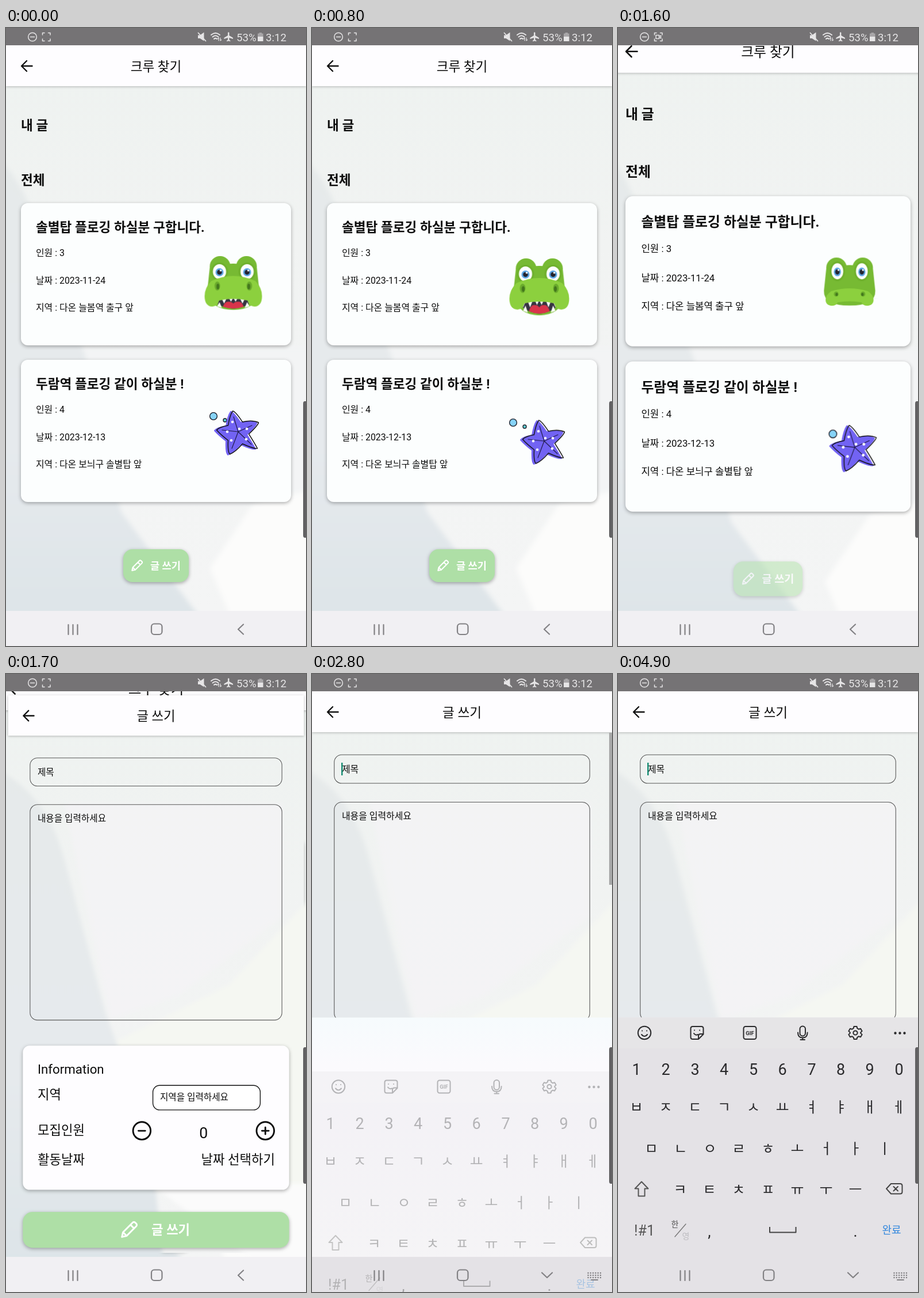
An HTML page that plays this animation: 522 px wide and 1073 px high, repeating every 5 s.

```html
<!DOCTYPE html>
<html lang="ko">
<head>
<meta charset="utf-8">
<title>크루 찾기</title>
<style>
html, body { margin: 0; width: 100%; height: 100%; overflow: hidden; background: #fff; }
svg { display: block; width: 522px; height: 1073px; }
text { font: 22.6px Roboto, "Noto Sans CJK KR", "Noto Sans CJK", sans-serif; fill: #0c0c0c; white-space: pre; }
.b { font-weight: 600; }
.s { font-size: 15.9px; }
.m { text-anchor: middle; }
.e { text-anchor: end; }
.ln { fill: none; stroke-linecap: round; stroke-linejoin: round; }
.shade { filter: drop-shadow(0 2px 3px rgba(0,0,0,.32)); }
.bar text { font-size: 18.6px; fill: #e6e5e6; }
.white { fill: #fff; }
.keys text { font-size: 25px; fill: #2a2a2c; text-anchor: middle; }
.keys .num { font-size: 27px; }

/* every animation shares one 5 s clock */
.list, .form, .fade, .press, .rec, .caret, .thumb, .board, .late, .early,
.croc, .head, .eyes, .mouth, .snout, .star, .bubbles { animation: 5s linear infinite; }

.list { transform-origin: 261px 521px; animation-name: grow; }
@keyframes grow {
  0%, 30.28% { transform: none; animation-timing-function: cubic-bezier(.35,.45,0,1); }
  38.28%, 100% { transform: scale(1.1); }
}
.form { transform-origin: 261px 521px; animation-name: enter; }
@keyframes enter {
  0%, 30.28% { transform: scale(.85); animation-timing-function: cubic-bezier(.35,.45,0,1); }
  38.28%, 100% { transform: none; }
}
.fade { animation-name: fade; }
@keyframes fade { 0%, 32.7% { opacity: 0; } 33.6%, 100% { opacity: 1; } }
.press { animation-name: press; }
@keyframes press { 0%, 22% { opacity: 1; } 25%, 30% { opacity: .2; } 32% { opacity: .5; } 35%, 100% { opacity: 1; } }

.rec { animation: rec 1s step-end infinite; }
@keyframes rec { 0% { opacity: 0; } 15% { opacity: 1; } 65%, 100% { opacity: 0; } }
.caret { animation-name: caret; animation-timing-function: step-end; }
@keyframes caret { 0% { opacity: 0; } 54% { opacity: 1; } 62% { opacity: 0; } 72% { opacity: 1; } 82% { opacity: 0; } 92%, 100% { opacity: 1; } }
.thumb { transform-origin: 0 102px; animation-name: thumb; animation-timing-function: step-end; }
@keyframes thumb {
  0% { opacity: 0; transform: none; }
  40% { opacity: 1; transform: none; }
  55% { opacity: 1; transform: scaleY(.295); }
  66%, 100% { opacity: 0; transform: scaleY(.295); }
}
.late { animation-name: late; animation-timing-function: step-end; }
@keyframes late { 0% { opacity: 0; } 55%, 100% { opacity: 1; } }
.early { animation-name: early; animation-timing-function: step-end; }
@keyframes early { 0% { opacity: 1; } 55%, 100% { opacity: 0; } }
.board { animation-name: board; }
@keyframes board {
  0%, 54.5% { opacity: 0; transform: translateY(130px); }
  56% { opacity: .34; transform: translateY(94px); }
  58% { opacity: .75; transform: translateY(44px); }
  60% { opacity: 1; transform: translateY(16px); }
  63%, 100% { opacity: 1; transform: none; }
}

.croc { animation-name: croc; }
@keyframes croc { 0% { transform: translateY(-4px); } 16%, 100% { transform: none; } }
.head { animation-name: head; }
@keyframes head { 0%, 24% { transform: none; } 29%, 100% { transform: translateY(2px) scale(.94); } }
.eyes { animation-name: eyes; }
@keyframes eyes { 0%, 24% { transform: none; } 29%, 100% { transform: translateY(1px) scale(.84,1.02); } }
.mouth { transform-origin: 0 22px; animation-name: mouth; }
@keyframes mouth { 0% { transform: scaleY(.8); } 16%, 24% { transform: none; } 29%, 100% { transform: scaleY(.01); } }
.snout { animation-name: snout; }
@keyframes snout { 0% { transform: scale(.96,.97); } 16%, 24% { transform: none; } 29%, 100% { transform: translateY(14px) scale(.76,.52); } }
.star { animation-name: bob; animation-timing-function: ease-in-out; }
@keyframes bob { 0%, 48%, 100% { transform: none; } 24% { transform: translateY(21px); } }
.bubbles { animation-name: drift; }
@keyframes drift {
  0% { transform: none; opacity: 1; }
  16% { transform: translate(-11px,-5px); opacity: 1; }
  22% { transform: translate(-15px,-7px); opacity: 0; }
  22.1% { transform: translate(22px,14px); opacity: 1; }
  32%, 100% { transform: translate(7px,5px); opacity: 1; }
}
</style>
</head>
<body>
<svg viewBox="0 0 522 1073">
<defs>
  <filter id="soft" x="-20%" y="-20%" width="140%" height="140%"><feGaussianBlur stdDeviation="4"/></filter>
  <linearGradient id="base" x2="0" y2="1">
    <stop offset="0" stop-color="#eef2f0"/><stop offset=".35" stop-color="#f1f3f2"/><stop offset="1" stop-color="#f4f5f5"/>
  </linearGradient>
  <linearGradient id="cool" x2="0" y2="1">
    <stop offset="0" stop-color="#e6eaea"/><stop offset=".6" stop-color="#e6eaed"/><stop offset="1" stop-color="#dde4e8"/>
  </linearGradient>
  <linearGradient id="blank" x2="0" y2="1">
    <stop offset="0" stop-color="#f6fbfd"/><stop offset=".2" stop-color="#fbfafd"/><stop offset="1" stop-color="#fdfdfd"/>
  </linearGradient>
  <clipPath id="app"><path d="M0 30H522V1012H0z"/></clipPath>
  <clipPath id="page"><path d="M0 30H522V1012H0z"/></clipPath>
  <path id="pencil" d="M4 20l1.2-5.2L15.8 4.2a2 2 0 0 1 2.8 0l1.2 1.2a2 2 0 0 1 0 2.8L9.2 18.8zM13.4 6.6l4 4M5.2 14.8l4 4"/>
  <path id="starfish" d="M-9-37Q-4-36 8-18Q25-22 36-17Q35-12 19 3Q28 17 34 28Q28 29 8 20Q-4 34-14 38Q-18 34-17 14Q-30 4-37-4Q-33-9-17-12Q-14-30-9-37z"/>
  <g id="top">
    <path d="M0 30H522V101H0z" fill="#fefdff" style="filter:drop-shadow(0 1px 2px rgba(0,0,0,.25))"/>
    <path d="M36 57L27 66L36 75M27.5 66H45.5" class="ln" stroke="#111" stroke-width="2.4"/>
  </g>
  <g id="eye">
    <ellipse rx="15" ry="16" fill="#6fb02d"/>
    <ellipse rx="11.5" ry="13" fill="#fff"/>
    <circle cy="1" r="7" fill="#5ba5e4"/>
    <circle cy="1" r="4.3" fill="#23232e"/>
    <circle cx="2" cy="-2" r="1.7" fill="#fff"/>
  </g>
</defs>

<g clip-path="url(#app)">
  <g class="list">
    <path d="M0 30H522V1012H0z" fill="url(#base)"/>
    <g filter="url(#soft)">
      <path d="M-20 225Q20 250 45 320L140 575L200 840L350 1040H-20z" fill="url(#cool)"/>
      <path d="M135 555H540V830H200z" fill="#f3f4f5"/>
      <path d="M430 826L355 938L394 1030H540V800z" fill="#fcfcfb"/>
    </g>
    <use href="#top"/>
    <text class="m" x="261" y="75">크루 찾기</text>
    <text class="b" x="26" y="177">내 글</text>
    <text class="b" x="26" y="272">전체</text>

    <g class="shade" fill="#fcfefe">
      <rect x="26" y="304" width="470" height="247" rx="12"/>
      <rect x="26" y="576" width="470" height="247" rx="12"/>
    </g>
    <text class="b" x="52" y="354">솔별탑 플로깅 하실분 구합니다.</text>
    <text class="s" x="52" y="396">인원 : 3</text>
    <text class="s" x="52" y="444">날짜 : 2023-11-24</text>
    <text class="s" x="52" y="491">지역 : 다온 늘봄역 출구 앞</text>
    <text class="b" x="52" y="626">두람역 플로깅 같이 하실분 !</text>
    <text class="s" x="52" y="668">인원 : 4</text>
    <text class="s" x="52" y="716">날짜 : 2023-12-13</text>
    <text class="s" x="52" y="763">지역 : 다온 보늬구 솔별탑 앞</text>

    <g transform="translate(395.5 450)"><g class="croc">
      <g class="head" fill="#77ba33">
        <circle cx="-23" cy="-32" r="18"/><circle cx="23" cy="-32" r="18"/>
        <path d="M-41-30Q0-44 41-30L45 8Q46 34 0 34Q-46 34-45 8z"/>
      </g>
      <g class="eyes">
        <use href="#eye" x="-24" y="-23"/><use href="#eye" x="24" y="-23"/>
      </g>
      <g class="mouth">
        <path d="M-38 22H38Q38 47 0 49Q-38 47-38 22z" fill="#77ba33"/>
        <path d="M-34 20H34Q34 42 0 46Q-34 42-34 20z" fill="#363541"/>
        <path d="M-18 42Q-15 30-8 31Q-3 31 0 35Q3 31 8 31Q15 30 18 42Q0 50-18 42z" fill="#d9344b"/>
        <path d="M-33 22h10l-5 13zM-21 22h10l-5 13zM-8 22h8l-4 9zM0 22h8l-4 9zM11 22h10l-5 13zM23 22h10l-5 13zM-28 41l4-9 4 12zM20 44l4-12 4 9z" fill="#fff"/>
      </g>
      <g class="snout">
        <path d="M-40-7Q0-25 40-7Q52 5 52 20Q52 38 38 39Q28 38 26 28Q0 22-26 28Q-28 38-38 39Q-52 38-52 20Q-52 5-40-7z" fill="#8cd03e"/>
        <ellipse cx="-29" cy="2" rx="5" ry="8" fill="#6aab2c"/><ellipse cx="29" cy="2" rx="5" ry="8" fill="#6aab2c"/>
        <ellipse cx="-28" cy="3" rx="2.6" ry="5" fill="#43761d"/><ellipse cx="28" cy="3" rx="2.6" ry="5" fill="#43761d"/>
      </g>
    </g></g>

    <g transform="translate(402 702)"><g class="star">
      <g class="bubbles" stroke="#15151f" stroke-width="1.3">
        <circle cx="-41" cy="-28" r="6.4" fill="#86d3f7"/>
        <circle cx="-21" cy="-21" r="3" fill="#62d2d8"/>
      </g>
      <use href="#starfish" x="1.5" fill="#fff"/>
      <use href="#starfish" x="-2" y="1" fill="#7263f3" stroke="#7263f3" stroke-width="2" stroke-linejoin="round"/>
      <use href="#starfish" x="1.5" class="ln" stroke="#111" stroke-width="1.4"/>
      <path d="M2-1L-6-27M2-1L26-12M2-1L25 21M2-1L-9 28M2-1L-26-4" class="ln" stroke="#1d1940" stroke-width="1.1"/>
      <path d="M-8-18h0M17-6h0M16 12h0M-10 14h0M-17-1h0M4-6h0" class="ln" stroke="#fff" stroke-width="4.6"/>
    </g></g>

    <g class="press">
      <rect class="shade" x="204" y="905" width="114" height="57" rx="16" fill="#aedfa6"/>
      <use href="#pencil" class="ln" stroke="#fff" stroke-width="1.9" transform="translate(215 920.5) scale(1.08)"/>
      <text class="b white" x="251" y="940" style="font-size:17.6px">글 쓰기</text>
    </g>
  </g>

  <g class="fade"><g class="form">
    <path d="M0 30H522V1012H0z" fill="url(#base)"/>
    <g filter="url(#soft)">
      <path d="M190 640L390 540L540 380V920L180 900z" fill="#f5f7f2"/>
      <path d="M-20 160Q70 205 100 322L172 590L250 800L275 1040H-20z" fill="url(#cool)"/>
      <path d="M100 222H484V420L300 560L180 602z" fill="#f4f3f6" opacity=".75"/>
      <path d="M250 890H540V1030H440z" fill="#fbfbfb"/>
    </g>
    <use href="#top"/>
    <text class="m" x="261" y="75">글 쓰기</text>
    <g fill="none" stroke="#5a5a5a" stroke-width="1.1">
      <rect x="38.7" y="140.3" width="444.6" height="49.5" rx="13"/>
      <rect x="38.7" y="222.5" width="444.6" height="379.5" rx="13"/>
    </g>
    <text class="s" x="52" y="171">제목</text>
    <text class="s" x="52" y="252">내용을 입력하세요</text>

    <rect class="shade" x="26" y="647" width="470" height="254" rx="12" fill="#fefdff"/>
    <text x="52" y="697">Information</text>
    <text x="52" y="741">지역</text>
    <rect x="255.5" y="717" width="189.5" height="43.3" rx="12" fill="#fff" stroke="#111" stroke-width="1.4"/>
    <text class="s" x="268" y="743">지역을 입력하세요</text>
    <text x="52" y="804">모집인원</text>
    <g class="ln" stroke="#0c0c0c" stroke-width="2.9">
      <circle cx="236" cy="797" r="15.5"/><circle cx="454" cy="797" r="15.5"/>
      <path d="M230 797h12M448 797h12M454 791v12"/>
    </g>
    <text class="m" x="345" y="810" style="font-size:27px">0</text>
    <text x="52" y="856">활동날짜</text>
    <text class="e" x="471" y="856">날짜 선택하기</text>

    <rect class="shade" x="26" y="940" width="470" height="63" rx="17" fill="#aedfa6"/>
    <use href="#pencil" class="ln" stroke="#fff" stroke-width="1.9" transform="translate(194.5 952) scale(1.6)"/>
    <text class="b white" x="253" y="980">글 쓰기</text>
    <rect class="caret" x="51" y="154" width="2.4" height="22" fill="#128a70"/>
    <rect class="thumb" x="517" y="102" width="5" height="895" fill="#a8a9a9"/>
  </g></g>
  <path class="late" d="M0 596.5H522V1012H0z" fill="url(#blank)"/>
</g>

<path d="M0 1012H522V1073H0z" fill="#f1f0f3"/>
<path class="late" d="M0 1012H522V1073H0z" fill="#e4e2e6"/>

<g class="board keys">
  <path d="M0 596.5H522V1073H0z" fill="#e4e2e6"/>
  <path d="M0 596.5H522V650H0z" fill="#e6e5e7"/>
  <g class="ln" stroke="#2a2a2c" stroke-width="2">
    <circle cx="46" cy="623" r="11.2"/>
    <path d="M41 626q5 6 10 0M42 619.5h.1M50 619.5h.1"/>
    <path d="M130 612h15q3.500 0 3.500 3.500v10l-8.500 8.500h-10q-3.500 0-3.500-3.500v-15q0-3.500 3.500-3.500zM148.500 625h-5q-3.500 0-3.500 3.500v5M133 618.500h.1M142 618.500h.1M132 624q3 4 7 2"/>
    <rect x="218.500" y="612" width="22" height="22" rx="3.500"/>
    <rect x="316.500" y="611.500" width="9.500" height="17" rx="4.700"/>
    <path d="M313 622.500q0 9 8.300 9t8.300-9M321.300 632v3M317.500 635h7.500"/>
    <g transform="translate(413 623)">
      <path d="M-2.500-11h5l.8 3.200 2.700 1.600 3.100-1 2.500 4.300-2.400 2.300v1.200l2.400 2.300-2.500 4.300-3.100-1-2.700 1.600-.8 3.200h-5l-.8-3.200-2.700-1.600-3.100 1-2.500-4.300 2.400-2.300v-1.200l-2.400-2.300 2.500-4.300 3.100 1 2.700-1.600z"/>
      <circle r="3.600"/>
    </g>
    <path d="M482.500 623.500h0M490.500 623.500h0M498.500 623.500h0" stroke-width="4.400"/>
    <path d="M41 881.500l11.500 12h-6v13h-11v-13h-6z" stroke="#555"/>
    <path d="M475 885h16q3.500 0 3.500 3.500v10.500q0 3.500-3.500 3.500h-16l-8-8.800zM479.500 890l7.500 7.500M487 890l-7.500 7.500" stroke="#444"/>
    <path d="M264 960v9.500h45.500v-9.500" stroke="#444" stroke-linecap="butt"/>
    <path d="M99 977L118 955" stroke="#777" stroke-width="1.400"/>
  </g>
  <text class="b" x="229.500" y="626.500" style="font-size:9.500px">GIF</text>
  <text class="num" x="32 83 134 184.500 235.500 286 337 387.500 438 489" y="696">1234567890</text>
  <text x="32 83 134 184.500 235.500 286 337 388 438 488" y="761">ㅂㅈㄷㄱㅅㅛㅕㅑㅐㅔ</text>
  <text x="58 109 160 210 261 312 362 413 464" y="833">ㅁㄴㅇㄹㅎㅗㅓㅏㅣ</text>
  <text x="108 159 210 261 312 362 413" y="904">ㅋㅌㅊㅍㅠㅜㅡ</text>
  <text x="46" y="975" style="fill:#555">!#1</text>
  <text x="99" y="960" style="font-size:14px;fill:#555">한</text>
  <text x="118" y="981" style="font-size:14px;fill:#bcbbbf">영</text>
  <text x="159 413" y="977" style="font-size:27px">,.</text>
  <text x="476" y="972" style="font-size:18px;fill:#2f86dd">완료</text>
</g>

<g class="ln" stroke="#828184" stroke-width="2.200">
  <path d="M108.500 1036v17M116.500 1036v17M124.500 1036v17"/>
  <rect x="253" y="1034.500" width="18.500" height="18.500" rx="5"/>
  <path class="early" d="M413 1035.500L404 1044L413 1052.500"/>
  <g class="late">
    <path d="M400 1039.500L409 1048L418 1039.500"/>
    <path d="M480.500 1040h22M480.500 1044h22M480.500 1048h22" stroke-dasharray="0 4.300" stroke-width="2.500"/>
    <path d="M486 1052h11" stroke-width="2"/>
  </g>
</g>

<g class="bar">
  <path d="M0 0H522V30H0z" fill="#757375"/>
  <g class="ln" stroke="#e6e5e6" stroke-width="1.500">
    <circle cx="46" cy="15.500" r="7.300"/>
    <path d="M42.500 15.500h7M63.500 12v-3.500h3.500M73.500 8.500h3.500v3.500M77 19v3.500h-3.500M67 22.500h-3.500v-3.500"/>
    <path class="rec" d="M66 12.500h5.500v6h-5.500zM71.500 15l3-2v5l-3-2"/>
    <path d="M357 12q7.500-6.500 15 0M359.500 15.500q5-4.500 10 0M362 19q2.500-2.200 5 0" stroke-width="2"/>
    <path d="M370 22v-5l-1.500 1.500M373 17v5l1.500-1.500" stroke-width="1.200"/>
    <path d="M334.500 8.500l13 14" stroke-width="1.800"/>
  </g>
  <g fill="#e6e5e6">
    <path d="M334 12.500h3.500l7-5v15l-7-4.500h-3.500z"/>
    <path d="M386 8q1.200-1.500 2.400 0v5l6.600 4v2l-6.600-2v3.500l2 1.500v1.300l-3.200-.8-3.200.8v-1.300l2-1.500v-3.500l-6.600 2v-2l6.600-4z"/>
    <path d="M440.500 8h4.500v1.500h2.500v5.500h-9.500v-5.500h2.500z" opacity=".45"/>
    <path d="M438 15h9.500v8h-9.500z"/>
  </g>
  <text x="401" y="22.500">53%</text>
  <text x="452" y="22.500">3:12</text>
</g>
<path d="M522 648h-2q-3 0-3 4v229q0 4 3 4h2z" fill="#626163"/>
</svg>
</body>
</html>
```
